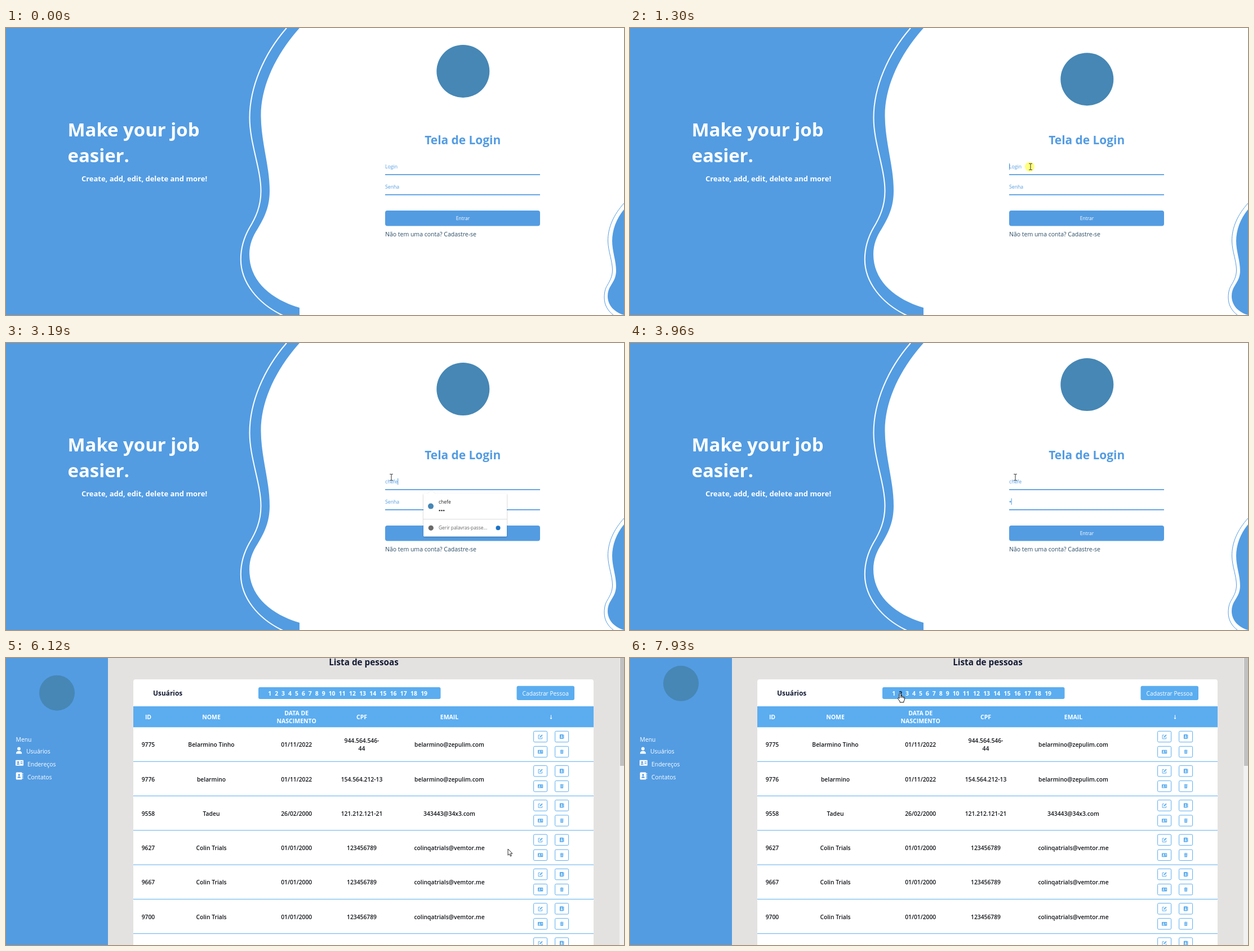
Recreate the animation shown at these times as an HTML page. Size 1097 px wide and 511 px high, loop 7.99 s.

```html
<!DOCTYPE html>
<html lang="pt">
<head>
<meta charset="utf-8">
<title>Login</title>
<style>
html, body { margin: 0; width: 100%; height: 100%; overflow: hidden; background: #fff; }
svg { display: block; width: 100%; height: 100%; }
text { font-family: 'Open Sans', 'Noto Sans', sans-serif; white-space: pre; }
.b { font-weight: 700; }
.s { font-weight: 600; }
.m { text-anchor: middle; }
</style>
</head>
<body>
<svg viewBox="0 0 1097 511">
  <defs>
    <filter id="shade" x="-10%" y="-10%" width="120%" height="130%">
      <feDropShadow dx="0" dy="1" stdDeviation="1.3" flood-color="#000" flood-opacity=".35"/>
    </filter>
    <g id="person">
      <circle cy="-3.1" r="2.9"/>
      <path d="M-5.2,6 C-5.2,2.6 -3.2,1 0,1 C3.2,1 5.2,2.6 5.2,6 Z"/>
    </g>
    <g id="card">
      <path fill-rule="evenodd" d="M-6,-5 H6 Q7,-5 7,-4 V4 Q7,5 6,5 H-6 Q-7,5 -7,4 V-4 Q-7,-5 -6,-5 Z M-5,3 H0 Q0,.8 -2.5,.8 Q-5,.8 -5,3 Z M-4.1,-1.4 a1.6,1.6 0 1 0 3.2,0 a1.6,1.6 0 1 0 -3.2,0 Z M1.7,-2.6 V-1.4 H5.5 V-2.6 Z M1.7,.2 V1.4 H5.5 V.2 Z"/>
    </g>
    <g id="book">
      <path fill-rule="evenodd" d="M-4.5,-6.5 H3.5 Q5,-6.5 5,-5 V5 Q5,6.5 3.5,6.5 H-4.5 Q-6,6.5 -6,5 V-5 Q-6,-6.5 -4.5,-6.5 Z M-3.4,3.6 H2.4 Q2.4,.7 -.5,.7 Q-3.4,.7 -3.4,3.6 Z M-2.3,-1.8 a1.8,1.8 0 1 0 3.6,0 a1.8,1.8 0 1 0 -3.6,0 Z"/>
      <path d="M5.7,-5 h1 v2.6 h-1 z M5.7,-1.3 h1 v2.6 h-1 z M5.7,2.4 h1 V5 h-1 z"/>
    </g>
    <g id="pen" fill="none" stroke="#5badf0">
      <path d="M-.3,-2.8 H-3.5 V3.8 H3 V.8" stroke-width="1"/>
      <path d="M-1,1.3 L3.4,-3.1" stroke-width="1.9"/>
    </g>
    <g id="bin">
      <path d="M-3.4,-3.6 H-1.3 L-.8,-4.3 H.8 L1.3,-3.6 H3.4 V-2.6 H-3.4 Z"/>
      <path fill-rule="evenodd" d="M-3,-2 H3 L2.6,4 H-2.6 Z M-1.4,-.8 V2.8 H-.7 V-.8 Z M.7,-.8 V2.8 H1.4 V-.8 Z"/>
    </g>
  </defs>

  <g id="login">
    <rect width="1097" height="511" fill="#fff"/>
    <path fill="#539ce2" d="M0,0 H521 C478,48 452,105 452.5,157 C453,205 468,245 468,290 C468,318 459,337 447,357 C438,371 432,385 432,403 C432,450 470,483 521,498 V511 H0 Z"/>
    <path fill="none" stroke="#fff" stroke-width="2" d="M498,0 C458,46 432.5,105 432.5,160 C432.5,205 452.5,250 452.5,290 C452.5,318 443,338 432,356 C423,372 416.8,390 416.8,412 C416.8,452 446,491 494,513"/>
    <path fill="#539ce2" d="M1097,323 C1083,340 1076,360 1076,379 C1076,398 1083,414 1083,432 C1083,443 1079,450 1074,458 C1070,464 1068,470 1068,477 C1068,494 1080,506 1097,511 Z"/>
    <path fill="none" stroke="#539ce2" d="M1097,312 C1079,332 1068,355 1068.5,380 C1069,398 1076.5,415 1076.5,431 C1076.5,442 1072,450 1068,457 C1064,463 1062,470 1062,480 C1062,494 1069,504 1078,511"/>
    <circle id="bigMark" cx="811.3" r="47" fill="#4687b5"/>
    <g id="loginText"></g>
    <path stroke="#539ce2" stroke-width="1.8" d="M673,261.2 H948 M673,296.8 H948"/>
    <text id="user" x="673" y="250" font-size="8.7" fill="#539ce2"></text>
    <text id="hint" x="673" y="286" font-size="8.7" fill="#539ce2">Senha</text>
    <g id="dots" fill="#539ce2"></g>
    <rect id="caret" width="1" height="11.5" fill="#539ce2"/>
    <g id="enter">
      <rect x="673" y="325" width="275" height="27.5" rx="4" fill="#539ce2"/>
      <text class="m" x="811" y="342.2" font-size="8.5" fill="#fff">Entrar</text>
    </g>
    <g id="popup">
      <path filter="url(#shade)" fill="#fff" d="M742.5,268 H749 L755,262.3 L761,268 H887.5 Q889,268 889,269.5 V343 Q889,344.5 887.5,344.5 H742.5 Q741,344.5 741,343 V269.5 Q741,268 742.5,268 Z"/>
      <path stroke="#d9dbde" d="M741,313.8 H889"/>
      <circle cx="754" cy="290.6" r="5" fill="#4687b5"/>
      <circle cx="754.3" cy="329.3" r="4.6" fill="#6a6a6a"/>
      <circle cx="873.5" cy="329.3" r="4" fill="#1a73c8"/>
      <g id="popupText"></g>
    </g>
  </g>

  <g id="list">
    <rect width="1097" height="511" fill="#e4e2e1"/>
    <rect width="181" height="511" fill="#539ce2"/>
    <rect x="1089" width="8" height="511" fill="#f1f1f1"/>
    <rect x="1090" width="7" height="192" fill="#c1c1c1"/>
    <circle id="smallMark" cx="90.5" r="31.5" fill="#4687b5"/>
    <g fill="#fff">
      <use href="#person" x="23" y="164.5"/>
      <use href="#card" x="24" y="186.8"/>
      <use href="#book" x="23.7" y="210"/>
    </g>
    <path fill="#fff" d="M226,511 V42 Q226,38 230,38 H1039 Q1043,38 1043,42 V511 Z"/>
    <rect x="448" y="52" width="323.5" height="21" rx="3" fill="#5badf0"/>
    <rect x="906.5" y="49.8" width="102.5" height="25.2" rx="3" fill="#5badf0"/>
    <rect x="226" y="86" width="817" height="37.3" fill="#5badf0"/>
    <g id="listText"></g>
    <g id="rows"></g>
  </g>

  <circle id="press" r="8.6" fill="#ffff70" fill-opacity=".9"/>
  <g id="arrow" stroke-linejoin="round">
    <path fill="#fff" stroke="#111" stroke-width=".9" d="M0,0 V11.2 L2.6,8.9 L4.4,13 L6.2,12.2 L4.5,8.2 H7.9 Z"/>
  </g>
  <g id="beam">
    <path fill="none" stroke="#333" d="M-2.8,-5.5 H-.9 L0,-5 L.9,-5.5 H2.8 M0,-5 V5 M-2.8,5.5 H-.9 L0,5 L.9,5.5 H2.8"/>
  </g>
  <g id="hand" stroke-linejoin="round">
    <path fill="#fff" stroke="#111" stroke-width="1" d="M-1.4,1 Q-1.3,-.4 0,-.4 Q1.4,-.4 1.4,1 V5.2 Q2.8,4.2 3.8,5.7 Q5.2,4.9 6,6.5 Q7.6,6 7.8,7.8 V11 Q7.6,13 6.4,14 V16 H-.4 V14.4 L-3.8,9.6 Q-4.2,8.2 -3.1,7.9 Q-2.2,7.8 -1.4,9 Z M1.4,5.2 V8 M3.8,5.7 V8.2 M6,6.5 V8.6"/>
  </g>
</svg>
<script>
const LOOP = 7990, PAGE_CHANGE = 5980, BOB_PERIOD = 5230;
const BLUE = '#539ce2', SKY = '#5badf0', NAVY = '#141b33', INK = '#111318';
const $ = id => document.getElementById(id);

function add(parent, tag, attrs, content) {
  const el = document.createElementNS('http://www.w3.org/2000/svg', tag);
  for (const k in attrs) el.setAttribute(k, attrs[k]);
  if (content !== undefined) el.textContent = content;
  parent.appendChild(el);
  return el;
}
const label = (parent, content, x, y, size, fill, cls = '') =>
  add(parent, 'text', { x, y, 'font-size': size, fill, class: cls }, content);
const show = (el, on) => el.setAttribute('visibility', on ? 'inherit' : 'hidden');
const move = (el, x, y) => el.setAttribute('transform', `translate(${x} ${y})`);

// Login page
const lt = $('loginText');
label(lt, 'Make your job', 109.5, 192.5, 32.9, '#fff', 'b');
label(lt, 'easier.', 109.5, 238.5, 32.9, '#fff', 'b');
label(lt, 'Create, add, edit, delete and more!', 134, 272.8, 12.95, '#fff', 'b');
label(lt, 'Tela de Login', 810.7, 206.8, 20.9, BLUE, 'b m');
label(lt, 'Não tem uma conta? Cadastre-se', 673, 371.4, 10.5, '#2b4c65');
const USER = 'chefe';
label($('popupText'), USER, 768, 286.4, 8.5, '#222');
label($('popupText'), 'Gerir palavras-passe...', 768, 332.4, 8.35, '#666');
for (let i = 0; i < 3; i++) {
  add($('popupText'), 'circle', { cx: 769.7 + i * 3.7, cy: 298.3, r: 1.3, fill: '#333' });
  add($('dots'), 'circle', { cx: 675 + i * 3.7, cy: 282.6, r: 1.4 });
}

// List page
const tx = $('listText');
label(tx, 'Menu', 17.5, 148.8, 10.4, '#fff');
label(tx, 'Usuários', 36, 170.3, 10.4, '#fff');
label(tx, 'Endereços', 38, 192.8, 10.4, '#fff');
label(tx, 'Contatos', 38, 216.3, 10.4, '#fff');
label(tx, 'Lista de pessoas', 635, 13, 15.3, NAVY, 'b m');
label(tx, 'Usuários', 261, 67, 11.9, NAVY, 'b');
label(tx, 'Cadastrar Pessoa', 957.7, 66.6, 10.2, '#fff', 'm');
const pages = Array.from({ length: 19 }, (_, i) =>
  label(tx, i + 1, i < 9 ? 468.2 + i * 11.93 : 578.6 + (i - 9) * 18.17, 66.8, 10.4, '#fff', 'b m'));

const COLS = [252.5, 364.5, 515.7, 631.5, 787];
['ID', 'NOME', '', 'CPF', 'EMAIL'].forEach((h, i) => label(tx, h, COLS[i], 109.3, 10.5, '#fff', 'b m'));
label(tx, 'DATA DE', COLS[2], 102, 10.5, '#fff', 'b m');
label(tx, 'NASCIMENTO', COLS[2], 116.3, 10.5, '#fff', 'b m');
add(tx, 'path', { d: 'M967.5,101.5 V108.5 M965.8,106.6 L967.5,108.6 L969.2,106.6', fill: 'none', stroke: '#fff' });

const tester = id => [id, 'Colin Trials', '01/01/2000', '123456789', 'colinqatrials@vemtor.me'];
const people = [
  ['9775', 'Belarmino Tinho', '01/11/2022', '944.564.546-|44', 'belarmino@zepulim.com'],
  ['9776', 'belarmino', '01/11/2022', '154.564.212-13', 'belarmino@zepulim.com'],
  ['9558', 'Tadeu', '26/02/2000', '121.212.121-21', '343443@34x3.com'],
  tester('9627'), tester('9667'), tester('9700'), []
];
const ICONS = ['pen', 'book', 'card', 'bin'], ICON_SCALE = [1, .62, .66, .9];
people.forEach((person, r) => {
  const g = add($('rows'), 'g', { transform: `translate(0 ${123.2 + r * 61.28})` });
  person.forEach((value, c) => {
    const lines = value.split('|');
    lines.forEach((line, n) =>
      label(g, line, COLS[c], 35.1 + (n - (lines.length - 1) / 2) * 14.4, 10.3, INK, 's m'));
  });
  ICONS.forEach((icon, i) => {
    const x = 948.6 + (i % 2) * 38, y = 16.8 + (i >> 1) * 27;
    add(g, 'rect', { x: x - 12, y: y - 9.7, width: 24, height: 19.4, rx: 2, fill: '#fff', stroke: SKY });
    add(g, 'use', { href: '#' + icon, fill: SKY, transform: `translate(${x} ${y}) scale(${ICON_SCALE[i]})` });
  });
  add(g, 'path', { d: 'M226,61.1 H1043', stroke: SKY });
});

// Pointer path: time, x, y
const PATH = [
  [90, 1018, 500], [440, 586, 345], [820, 711, 247], [1720, 711, 247], [2150, 684, 239],
  [4400, 684, 239], [4980, 957, 380], [5300, 897.5, 342.5], [5900, 897.5, 342.5], [6000, 891, 340],
  [6250, 891, 340], [6690, 698, 256], [7510, 476, 92], [7800, 479.5, 63], [LOOP, 479.5, 63]
];
function pointerAt(t) {
  const i = Math.max(1, PATH.findIndex(p => p[0] > t));
  const [a, b] = [PATH[i - 1], PATH[i]];
  const u = Math.min(1, Math.max(0, (t - a[0]) / (b[0] - a[0])));
  const k = u * u * (3 - 2 * u);
  return [a[1] + (b[1] - a[1]) * k, a[2] + (b[2] - a[2]) * k];
}
const inside = (x, y, l, t, r, b) => x >= l && x <= r && y >= t && y <= b;
const during = (t, from, to) => t >= from && t < to;
const wave = d => Math.cos(2 * Math.PI * d / BOB_PERIOD);
const DOT_TIMES = [3900, 4120, 4350];

function drawLogin(t, overButton) {
  $('bigMark').setAttribute('cy', 82.8 + 10.3 * wave(t - 1815));
  const typed = Math.min(USER.length, Math.max(0, Math.floor((t - 2600) / 140) + 1));
  $('user').textContent = typed ? USER.slice(0, typed) : 'Login';
  const dots = DOT_TIMES.filter(d => t >= d).length;
  [...$('dots').children].forEach((dot, i) => show(dot, i < dots));
  show($('hint'), !dots);
  show($('popup'), during(t, 1380, 3310));

  const onPassword = t >= 3450;
  const lastKey = dots ? DOT_TIMES[dots - 1] : onPassword ? 3450 : typed ? 2600 + (typed - 1) * 140 : 1250;
  show($('caret'), during(t, 1250, 5650) && Math.floor((t - lastKey) / 530) % 2 === 0);
  const width = onPassword ? dots * 3.7 : typed ? $('user').getComputedTextLength() : 0;
  move($('caret'), 673 + width, onPassword ? 276.5 : 241);
  $('enter').setAttribute('transform',
    overButton ? 'translate(810.7 338.7) scale(1.01) translate(-810.7 -338.7)' : '');
}

function drawList(t, x, y) {
  $('smallMark').setAttribute('cy', 52.3 + 10 * wave(t - PAGE_CHANGE));
  const hover = inside(x, y, 474, 54, 486, 71);
  pages[1].setAttribute('fill', hover ? NAVY : '#fff');
  return hover;
}

function render(t) {
  const login = t < PAGE_CHANGE;
  show($('login'), login);
  show($('list'), !login);
  const [x, y] = pointerAt(t);
  const overButton = login && t > 4400 && inside(x, y, 673, 325, 948, 352);
  const overField = login && t > 500 && !overButton && inside(x, y, 673, 232, 948, 297);
  let hand = overButton;
  if (login) drawLogin(t, overButton);
  else hand = drawList(t, x, y);

  const visible = t >= 90;
  show($('hand'), visible && hand);
  show($('beam'), visible && overField);
  show($('arrow'), visible && !hand && !overField);
  for (const id of ['hand', 'beam', 'arrow']) move($(id), x, y);
  show($('press'), during(t, 1220, 1400) || during(t, 5620, 5780));
  move($('press'), x - 1.5, y);
}

const start = performance.now();
function tick() {
  render((performance.now() - start) % LOOP);
  requestAnimationFrame(tick);
}
tick();
</script>
</body>
</html>
```
